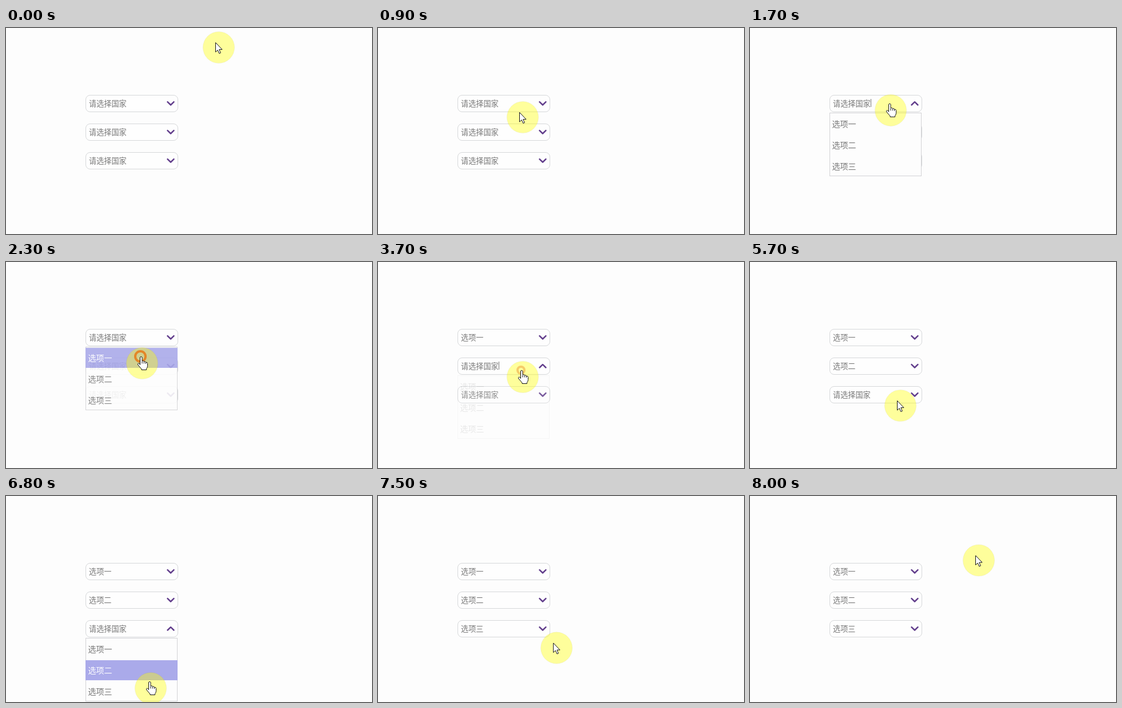
Write an HTML page that moves like this. It is 640x360 px and loops after 9600 ms.

```html
<!DOCTYPE html>
<html lang="zh">
<head>
<meta charset="utf-8">
<title>Select boxes</title>
<style>
  html, body { margin: 0; width: 100%; height: 100%; overflow: hidden; background: #fdfdfd; }
  svg { display: block; width: 640px; height: 360px; }
  text { font-family: "Noto Sans CJK SC", "Noto Sans CJK", sans-serif; font-size: 13.15px; font-weight: 300; fill: #777; }
  .list text { font-size: 14px; }
  .box { fill: #fefefe; stroke: #d6d8da; }
  .panel { fill: #fdfdfd; stroke: #d2d2d5; }
  .chevron { fill: none; stroke: #623e8c; stroke-width: 2.5; stroke-linecap: round; stroke-linejoin: round; }
  .pointer { fill: #fff; stroke: #111; stroke-linejoin: round; }
</style>
</head>
<body>
<svg id="stage" viewBox="0 0 640 360"></svg>
<script>
const LOOP = 9600, STEP = 100;
const LEFT = 139, RIGHT = 301, BOX_H = 30, LIST_TOP = 31, ROW_PITCH = 37, ROW_H = 35;
const PLACEHOLDER = '请选择国家';
const OPTIONS = ['选项一', '选项二', '选项三'];

// Click times that open and close each select, and the option picked
const selects = [
  { y: 117, open: 1250, close: 2225, pick: 0 },
  { y: 167, open: 3550, close: 5075, pick: 1 },
  { y: 217, open: 6080, close: 7125, pick: 2 }
];
const FADE_IN_DELAY = 120, FADE_IN = 200, FADE_OUT_DELAY = 65, FADE_OUT = 100;
const RING_LIFE = 300, BLINK = 530;

// Pointer halo centre: time, x, y
const path = [
  [400, 372, 34], [900, 253, 156], [1200, 247, 140], [1600, 247, 140],
  [2100, 238, 177], [2400, 238, 177], [2800, 217, 191], [3200, 246, 209],
  [3300, 246, 209], [3500, 253, 201], [3800, 253, 201], [4300, 262, 256],
  [4800, 238, 270], [5500, 238, 270], [5700, 263, 251], [5800, 286, 243],
  [6300, 284, 243], [6800, 253, 336], [7000, 250, 343], [7200, 250, 343],
  [7900, 408, 146], [8000, 400, 112.5]
];

const clamp = v => Math.max(0, Math.min(1, v));
const smooth = p => p * p * (3 - 2 * p);

function add(parent, tag, attrs = {}, content = '') {
  const el = document.createElementNS('http://www.w3.org/2000/svg', tag);
  set(el, attrs);
  el.textContent = content;
  return parent.appendChild(el);
}

function set(el, attrs) {
  for (const name in attrs) el.setAttribute(name, attrs[name]);
}

const stage = document.getElementById('stage');

for (const s of selects) {
  const field = add(stage, 'g', { transform: `translate(0 ${s.y})` });
  add(field, 'rect', { class: 'box', x: LEFT + .5, y: .5, width: 161, height: 29, rx: 7.5 });
  s.label = add(field, 'text', { x: 145, y: 20 });
  s.caret = add(field, 'path', { d: 'M211.5 7V21', stroke: '#777' });
  s.chevron = add(field, 'path', { class: 'chevron' });
}

for (const s of selects) {
  s.list = add(stage, 'g', { class: 'list', transform: `translate(0 ${s.y + LIST_TOP})` });
  add(s.list, 'rect', { class: 'panel', x: LEFT + .5, y: .5, width: 160, height: 110 });
  s.rows = OPTIONS.map((name, i) => {
    const y = 2 + i * ROW_PITCH;
    return {
      back: add(s.list, 'rect', { x: LEFT, y, width: 161, height: ROW_H, fill: '#aaaaea' }),
      text: add(s.list, 'text', { x: 143.5, y: y + 22.5 }, name)
    };
  });
}

const halo = add(stage, 'circle', { r: 27.6, fill: '#ff0', 'fill-opacity': .39, stroke: '#000', 'stroke-opacity': .04 });
const ring = add(stage, 'circle', { fill: 'none', stroke: '#e67814', 'stroke-width': 4 });
const arrow = add(stage, 'path', { class: 'pointer', d: 'M.5 .5V17L4.2 13.6 6.8 19.5 9.3 18.5 6.8 12.6H12Z' });
const hand = add(stage, 'g', { class: 'pointer' });
add(hand, 'path', { d: 'M-1.5 14V1.5Q-1.5 0 .2 0T2 1.5V7.5Q5 6.5 5.3 8.5Q8 7.8 8.4 9.8Q11.5 9.3 11.5 12V16Q11.5 19 9.5 21V23H1V21.5L-5 14.5Q-6.5 12 -4.5 11.5Q-3 11.3 -1.5 14Z' });
add(hand, 'path', { d: 'M2 8V12M5.3 9V12M8.4 10V12.5', fill: 'none' });

function pointerAt(t) {
  const next = path.findIndex(k => k[0] > t);
  if (next === 0) return path[0].slice(1);
  if (next < 0) return path[path.length - 1].slice(1);
  const [t0, x0, y0] = path[next - 1], [t1, x1, y1] = path[next];
  const p = smooth((t - t0) / (t1 - t0));
  return [x0 + (x1 - x0) * p, y0 + (y1 - y0) * p];
}

function listOpacity(s, t) {
  const shown = clamp((t - s.open - FADE_IN_DELAY) / FADE_IN);
  const hidden = clamp((t - s.close - FADE_OUT_DELAY) / FADE_OUT);
  return shown * (1 - hidden);
}

function overControl([cx, cy], t) {
  const x = cx - 6, y = cy - 9;
  return x > LEFT && x < RIGHT && selects.some(s => {
    const height = listOpacity(s, t) > 0 ? LIST_TOP + 111 : BOX_H;
    return y >= s.y && y < s.y + height - .5;
  });
}

function drawSelect(s, t, tipY) {
  const opacity = listOpacity(s, t);
  const openedFor = t - s.open - FADE_IN_DELAY;
  const expanded = openedFor >= 0 && t < s.close + FADE_OUT_DELAY;
  const chosen = t >= s.close + FADE_OUT_DELAY + FADE_OUT;
  const caretOn = expanded && openedFor % (2 * BLINK) < BLINK;
  s.label.textContent = chosen ? OPTIONS[s.pick] : PLACEHOLDER;
  set(s.caret, { opacity: caretOn ? 1 : 0 });
  set(s.chevron, { d: expanded ? 'M282.5 17.5L288 12.2 293.5 17.5' : 'M282.5 12.2L288 17.5 293.5 12.2' });
  set(s.list, { opacity });
  const active = Math.floor((tipY - s.y - LIST_TOP - 2) / ROW_PITCH);
  s.rows.forEach((row, i) => {
    set(row.back, { opacity: i === active ? 1 : 0 });
    row.text.style.fill = i === active ? '#fff' : '';
  });
}

function draw(t) {
  const now = pointerAt(t), before = pointerAt(t - STEP);
  const [cx, cy] = now;
  // Hover feedback trails the pointer by one step
  for (const s of selects) drawSelect(s, t, before[1] - 11);

  const clicks = selects.flatMap(s => [s.open, s.close]);
  const click = clicks.find(c => t >= c && t < c + RING_LIFE);
  const p = click === undefined ? 1 : (t - click) / RING_LIFE;
  set(ring, { cx: cx - 3, cy: cy - 12, r: 12 * (1 - p), opacity: clamp(1.5 * (1 - p) ** 2) });

  const pointing = overControl(now, t) && overControl(before, t);
  set(halo, { cx, cy });
  set(arrow, { transform: `translate(${cx - 6} ${cy - 9})`, opacity: pointing ? 0 : 1 });
  set(hand, { transform: `translate(${cx - 2} ${cy - 11.5})`, opacity: pointing ? 1 : 0 });
}

const start = performance.now();
function tick() {
  const t = (performance.now() - start) % LOOP;
  draw(Math.floor(t / STEP) * STEP);
  requestAnimationFrame(tick);
}
tick();
</script>
</body>
</html>
```
